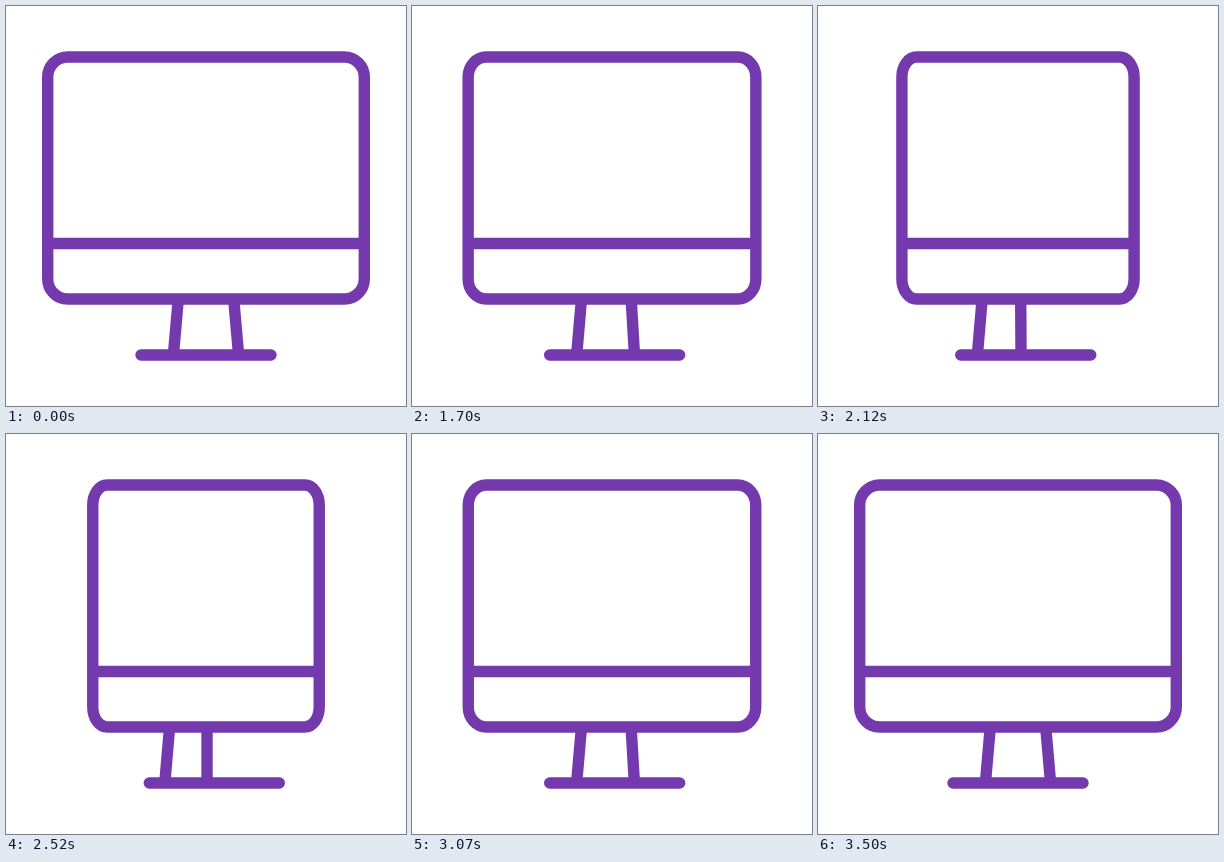
An HTML page that plays this animation: 400 by 400 pixels, repeating every 3520 ms.

```html
<!DOCTYPE html>
<html lang="en">
<head>
<meta charset="utf-8">
<title>Monitor resize</title>
<style>
  html, body { margin: 0; width: 100%; height: 100%; overflow: hidden; background: #fff; }
  svg { display: block; width: 100%; height: 100%; }
  svg * { fill: none; stroke: #743aad; stroke-width: 11.4; }
  #base { stroke-linecap: round; }
</style>
</head>
<body>
<svg viewBox="0 0 400 400">
  <path id="legs"/>
  <path id="base"/>
  <path id="divider"/>
  <rect id="frame" y="51" height="242" ry="20"/>
</svg>
<script>
  const LOOP = 3520, STEP = 25;
  const [legs, base, divider, frame] =
    ["legs", "base", "divider", "frame"].map(id => document.getElementById(id));

  // Bezier easing with control points (a, 0) and (b, 1).
  function ease(x, a, b) {
    let lo = 0, hi = 1;
    for (let i = 0; i < 30; i++) {
      const s = (lo + hi) / 2, r = 1 - s;
      if (3 * a * s * r * r + 3 * b * s * s * r + s ** 3 < x) lo = s;
      else hi = s;
    }
    return lo * lo * (3 - 2 * lo);
  }

  // 0 = wide screen, 1 = narrow screen
  function narrowing(t) {
    if (t <= 1500 || t >= 3500) return 0;
    return t < 2500
      ? ease((t - 1500) / 1000, 0.333, 0)
      : 1 - ease((t - 2500) / 1000, 0.6, 0.4);
  }

  function draw(time) {
    const shown = Math.floor((time % LOOP) / 10) * 10;
    const p = narrowing(Math.floor((shown + 5) / STEP) * STEP);
    const mix = (from, to) => +(from + (to - from) * p).toFixed(3);

    const left = mix(41.7, 86.8), width = 400 - 2 * left;
    frame.setAttribute("x", left);
    frame.setAttribute("width", width);
    frame.setAttribute("rx", mix(20, 14.3));
    divider.setAttribute("d", `M${left} 237.5h${width}`);
    legs.setAttribute("d",
      `M${mix(172.3, 163.6)} 293L${mix(167.4, 158.8)} 349` +
      `M${mix(227.7, 201)} 293L${mix(232.6, 201)} 349`);
    base.setAttribute("d", `M${mix(135, 143.3)} 349h130`);
  }

  const start = performance.now();
  function tick() {
    draw(performance.now() - start);
    requestAnimationFrame(tick);
  }
  tick();
</script>
</body>
</html>
```
